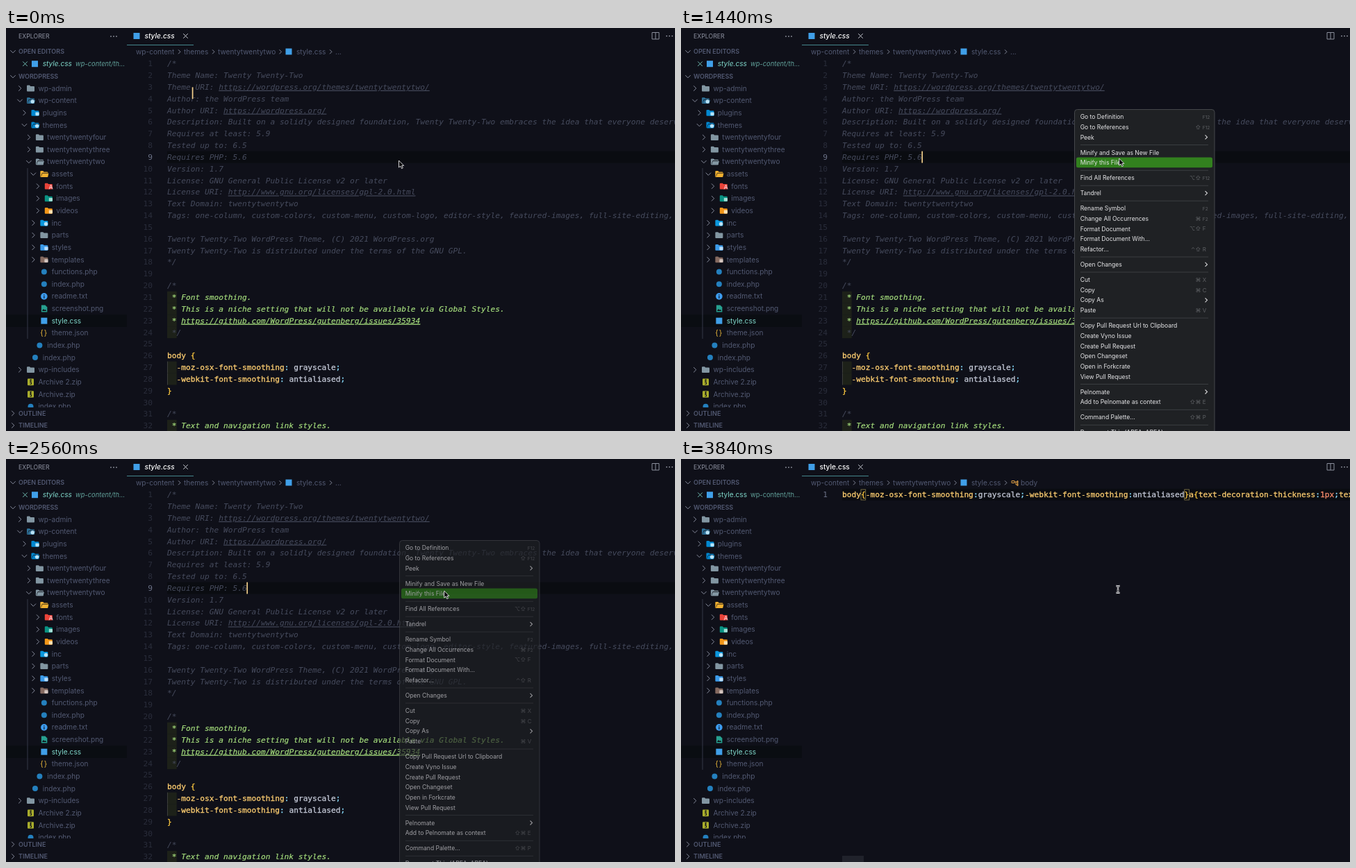
Write an HTML page that moves like this. It is 963 px wide and 581 px high and loops after 3.92 s.

```html
<!DOCTYPE html>
<html lang="en">
<head>
<meta charset="utf-8">
<title>Minify a stylesheet</title>
<style>
  html, body { margin: 0; width: 100%; height: 100%; overflow: hidden; background: #0f1019; }
  svg { display: block; width: 100%; height: 100%; }
  text { white-space: pre; font: 10.15px Inter, sans-serif; fill: #525972; }
  .head { font-size: 9px; font-weight: 600; }
  .code { font: 11.21px "DejaVu Sans Mono", monospace; font-variant-ligatures: none; fill: #c3c8d6; }
  .bright { stroke: #c3c8d6; stroke-width: .3; }
  .comment { font-style: italic; fill: #464b5d; }
  .note { font-style: italic; fill: #a4dc7c; stroke: #a4dc7c; stroke-width: .2; }
  .link { text-decoration: underline 1px; text-underline-offset: 2.4px; }
  .num { text-anchor: end; fill: #2a2d3b; }
  .num.active { fill: #6c7288; }
  .key { fill: #fbcc70; stroke: #fbcc70; }
  .brace { fill: #ffca40; stroke: #ffca40; }
  .punct { fill: #89ddff; stroke: #89ddff; }
  .value { fill: #f78c6c; stroke: #f78c6c; }
  .teal { fill: #80d8cb; }
  .preview .title { font-style: italic; }
  .item { font-size: 8.55px; fill: #e6e6e8; }
  .combo { font: 8px Inter, "DejaVu Sans", sans-serif; fill: #5f6165; }
  .chev { fill: none; stroke: #858a9b; }
</style>
</head>
<body>
<svg id="stage" viewBox="0 0 963 581"></svg>
<script>
const LOOP = 3920, STEP = 80;
const MENU_OPEN = 160, MENU_FADE = 2480, MENU_GONE = 2720, MINIFIED = 3200, CARET_OFF = 3700;
const CODE_X = 232, CHAR = 6.75, LINE = 16.84;

const text = (x, y, content, cls = '', style = '') =>
  `<text x="${x}" y="${y}" class="${cls}" style="${style}">${content}</text>`;
const rect = (x, y, w, h, fill, extra = '') =>
  `<rect x="${x}" y="${y}" width="${w}" height="${h}" fill="${fill}" ${extra}/>`;
const circle = (x, y, r, fill) => `<circle cx="${x}" cy="${y}" r="${r}" fill="${fill}"/>`;
const path = (d, attrs) => `<path d="${d}" ${attrs}/>`;
const at = (x, y, content) => `<g transform="translate(${x} ${y})">${content}</g>`;
const chevron = (x, y, down = false, size = 3.7) =>
  path(`M${-size / 2} ${-size}L${size / 2} 0L${-size / 2} ${size}`,
    `class="chev" transform="translate(${x} ${y}) rotate(${down ? 90 : 0})"`);
const cross = (x, y, color) =>
  path(`M${x - 3.3} ${y - 3.3}l6.6 6.6m0 -6.6l-6.6 6.6`, `stroke="${color}" fill="none"`);
const dots = (x, y) => [-4, 0, 4].map(d => circle(x + d, y, 0.85, '#b4b8c4')).join('');

// Icons, each centred on the origin
const folderBack = 'M-5.5 -3.4q0 -1 1 -1h3l1.3 1.3h4.7q1 0 1 1v5.5q0 1 -1 1h-9q-1 0 -1 -1z';
const dotMark = circle(2.7, 1.4, 2.7, '#b9e2f7');
const boxMark = color => rect(0.5, -0.8, 5.2, 4.8, color, 'rx=".8"');
const icons = {
  folder: (color, mark = '') => path(folderBack, `fill="${color}"`) + mark,
  open: (color, mark = '') => path(folderBack, `fill="${color}"`) +
    path('M-4 3.6L-2.6 -1.2H5.2', 'fill="none" stroke="#0f1019"') +
    path('M-2.5 -.8H6.6L5 4.4H-4.4z', `fill="${color}"`) + mark,
  css: () => rect(-4.5, -4.5, 9, 9, '#409fe8'),
  php: () => circle(0, 0, 4, '#2480be'),
  info: () => circle(0, 0, 4.8, '#3d9cf0') + rect(-.6, -2.7, 1.2, 1.2, '#0f1019') + rect(-.6, -.6, 1.2, 3.4, '#0f1019'),
  image: () => path('M-4 -5H1.5L4.5 -2V5H-4z', 'fill="#27a090"') + path('M-3 3.5l2 -3l1.5 1.7l1.2 -1l1.7 2.3z', 'fill="#0f1019"'),
  json: () => text(-5.6, 3.6, '{}', '', 'fill:#e5b43a;font-size:10.5px;letter-spacing:1px'),
  zip: () => rect(-4.5, -4.8, 9, 9.6, '#a9ad2c', 'rx="1"') +
    path('M-1 -3.5h2l-2 2h2l-2 2h2v2.5h-2', 'fill="none" stroke="#0f1019"')
};

// level, chevron, name, icon, colour, mark
const grey = '#8296a2';
const tree = [
  [0, '>', 'wp-admin', 'folder', grey],
  [0, 'v', 'wp-content', 'open', '#2f7198', dotMark],
  [1, '>', 'plugins', 'folder', '#0288d1', boxMark('#b3e5fc')],
  [1, 'v', 'themes', 'open', '#0288d1', dotMark],
  [2, '>', 'twentytwentyfour', 'folder', grey],
  [2, '>', 'twentytwentythree', 'folder', grey],
  [2, 'v', 'twentytwentytwo', 'open', grey],
  [3, 'v', 'assets', 'open', '#f0b030'],
  [4, '>', 'fonts', 'folder', '#e94339', path('M.8 4.2L3.3 -2L5.8 4.2M1.7 2.2H5', 'fill="none" stroke="#ffcdd2"')],
  [4, '>', 'images', 'folder', '#0a9384', boxMark('#a6ded6')],
  [4, '>', 'videos', 'folder', '#f39618', boxMark('#ffe0b2')],
  [3, '>', 'inc', 'folder', '#0b97dd', dotMark],
  [3, '>', 'parts', 'folder', grey],
  [3, '>', 'styles', 'folder', '#3b9bea', boxMark('#bbdefb')],
  [3, '>', 'templates', 'folder', '#856a60', boxMark('#d3c5bf')],
  [3, '', 'functions.php', 'php'],
  [3, '', 'index.php', 'php'],
  [3, '', 'readme.txt', 'info'],
  [3, '', 'screenshot.png', 'image'],
  [3, '', 'style.css', 'css'],
  [3, '', 'theme.json', 'json'],
  [2, '', 'index.php', 'php'],
  [1, '', 'index.php', 'php'],
  [0, '>', 'wp-includes', 'folder', grey],
  [0, '', 'Archive 2.zip', 'zip'],
  [0, '', 'Archive.zip', 'zip'],
  [0, '', 'index.php', 'php']
];

function sidebar() {
  const rows = tree.map(([level, arrow, name, icon, color, mark], i) => {
    const y = 87 + i * 17.64, shift = level * 6.45;
    const chosen = name === 'style.css';
    return (chosen ? rect(0, y - 8.8, 174, 17.6, '#0a0d12') : '') +
      (arrow ? chevron(20 + shift, y, arrow === 'v') : '') +
      at(35.5 + shift, y, icons[icon](color, mark)) +
      text(46.4 + shift, y + 3.6, name, chosen ? 'teal' : '');
  }).join('');
  const section = (y, name, down) => chevron(10, y, down) + text(18, y + 3.2, name, 'head');
  return `<clipPath id="treeArea"><rect width="174" height="547"/></clipPath>
    <g clip-path="url(#treeArea)">${rows}</g>` +
    path('M31 202V448', 'stroke="#343849"') +
    text(18, 14.8, 'EXPLORER', '', 'font-size:8.75px;fill:#8f93a2') + dots(155, 12) +
    section(34, 'OPEN EDITORS', true) + section(70, 'WORDPRESS', true) +
    section(555.5, 'OUTLINE') + section(573, 'TIMELINE') +
    cross(27.5, 51.7, '#6fbdb2') + at(41.5, 51.7, icons.css()) +
    text(52.7, 55.4, 'style.css', 'teal title') +
    text(100, 55.2, 'wp-content/th...', 'teal title', 'font-size:9.35px;opacity:.72');
}

function editorTop() {
  return at(188, 11.5, icons.css()) + text(199.5, 15.2, 'style.css', 'title', 'fill:#fff;font-weight:500') +
    cross(258.5, 11.5, '#c6c9d2') + rect(174, 24, 96, 1, '#44868c') +
    [[187, 'wp-content'], [256, 'themes'], [305, 'twentytwentytwo'], [418, 'style.css']]
      .map(([x, name]) => text(x, 37.8, name)).join('') +
    [249.5, 298.5, 395, 467.5].map(x => chevron(x, 34.3, false, 3)).join('') +
    at(407, 34, icons.css()) +
    path('M930 6.5h10v9.5h-10zM935 6.5v9.5', 'fill="none" stroke="#8b8f9c"') + dots(955, 11.5);
}

const header = `/*
Theme Name: Twenty Twenty-Two
Theme URI: https://wordpress.org/themes/twentytwentytwo/
Author: the WordPress team
Author URI: https://wordpress.org/
Description: Built on a solidly designed foundation, Twenty Twenty-Two embraces the idea that everyone deserves
Requires at least: 5.9
Tested up to: 6.5
Requires PHP: 5.6
Version: 1.7
License: GNU General Public License v2 or later
License URI: http://www.gnu.org/licenses/gpl-2.0.html
Text Domain: twentytwentytwo
Tags: one-column, custom-colors, custom-menu, custom-logo, editor-style, featured-images, full-site-editing,

Twenty Twenty-Two WordPress Theme, (C) 2021 WordPress.org
Twenty Twenty-Two is distributed under the terms of the GNU GPL.
*/

/*
 * Font smoothing.
 * This is a niche setting that will not be available via Global Styles.
 * https://github.com/WordPress/gutenberg/issues/35934
 */

body {
  -moz-osx-font-smoothing: grayscale;
  -webkit-font-smoothing: antialiased;
}

/*
 * Text and navigation link styles.`.split('\n');
const minified = 'body{-moz-osx-font-smoothing:grayscale;-webkit-font-smoothing:antialiased}' +
  'a{text-decoration-thickness:1px;text-underline-offset:.1em}';

const lineY = n => 51.3 + (n - 1) * LINE;
const colX = col => CODE_X + col * CHAR;
const codeLine = (n, content, cls) => text(CODE_X, lineY(n) + 3.9, content, 'code ' + cls);
const lineNumber = (n, active) => text(211, lineY(n) + 3.9, n, 'code num' + (active ? ' active' : ''));
const activeLine = n => rect(CODE_X, lineY(n) - LINE / 2, 731, LINE, '#0a0c11');

const paintCss = css => css.replace(/(\d+px)|([\w-]+)(?=\s*[:{])|([{}])|([:;])/g,
  (token, value, key, brace) => {
    const cls = value ? 'value' : key ? 'key' : brace ? 'brace' : 'punct';
    return `<tspan class="${cls}">${token}</tspan>`;
  });
const paintLinks = line => line.replace(/https?:\S+/, '<tspan class="link">$&</tspan>');

function fullCode() {
  return activeLine(9) + header.map((line, i) => {
    const n = i + 1, isCss = n > 25 && n < 30, top = lineY(n) - LINE / 2;
    const indent = line.startsWith(' ') ? rect(CODE_X, top, 13.7, LINE + .1, '#1d2119') : '';
    const guide = line.startsWith('  ') ? rect(CODE_X, top, 1, LINE + .1, '#3b3e3b') : '';
    const cls = isCss ? 'bright' : /^ \* /.test(line) ? 'note' : 'comment';
    return indent + guide + lineNumber(n, n === 9) + codeLine(n, isCss ? paintCss(line) : paintLinks(line), cls);
  }).join('') + text(474, 37.8, '...');
}

function minifiedCode() {
  const bracket = char => rect(colX(minified.indexOf(char)), 44, CHAR, 15, 'none', 'stroke="#8d8050" stroke-width=".8"');
  return activeLine(1) + lineNumber(1, true) + bracket('{') + bracket('}') +
    codeLine(1, paintCss(minified), 'bright') + rect(CODE_X, 572, 31, 9, '#20222b') +
    path('M476 31.5h4v3h-4zM480 33h5M482 33v4h3M485 31.5h-1v3h1zM485 35.5h-1v3h1z', 'fill="none" stroke="#d89a45"') +
    text(489, 37.8, 'body');
}

// Label, then modifiers and key, or '>' for a submenu
const menuGroups = [
  [['Go to Definition', '', 'F12'], ['Go to References', '⇧', 'F12'], ['Peek', '>']],
  [['Minify and Save as New File'], ['Minify this File']],
  [['Find All References', '⌥⇧', 'F12']],
  [['Tandrel', '>']],
  [['Rename Symbol', '', 'F2'], ['Change All Occurrences', '⌘', 'F2'], ['Format Document', '⌥⇧', 'F'],
    ['Format Document With...'], ['Refactor...', '⌃⇧', 'R']],
  [['Open Changes', '>']],
  [['Cut', '⌘', 'X'], ['Copy', '⌘', 'C'], ['Copy As', '>'], ['Paste', '⌘', 'V']],
  [['Copy Pull Request Url to Clipboard'], ['Create Vyno Issue'], ['Create Pull Request'],
    ['Open Changeset'], ['Open in Forkcrate'], ['View Pull Request']],
  [['Pelnomate', '>'], ['Add to Pelnomate as context', '⇧⌘', 'E']],
  [['Command Palette...', '⇧⌘', 'P']],
  [['Document This (AREA, AREA)']]
];

function menu() {
  let y = 128, out = '';
  menuGroups.forEach((group, g) => {
    if (g) {
      out += rect(575, y - 4, 184, .8, '#424448');
      y += 7.3;
    }
    for (const [label, modifiers, key] of group) {
      out += text(574.7, y + 3.1, label, 'item');
      if (modifiers === '>') {
        out += path(`M754.5 ${y - 3}l3 3l-3 3`, 'fill="none" stroke="#d8d8da" stroke-width="1.1"');
      } else if (key) {
        out += text(748.5, y + 2.9, modifiers, 'combo', 'text-anchor:end') +
          text(750.8, y + 2.9, key, 'combo', key.length > 1 ? 'font-size:6.6px' : '');
      }
      y += 14.7;
    }
  });
  return rect(566.5, 117.5, 201.5, 475, '#1f2124', 'rx="4" stroke="#45474b"') +
    rect(569, 0, 196, 14.6, '#32801e', 'rx="2.5" id="highlight"') + out;
}

const arrow = path('M0 0V10L2.4 8L4 11.6L5.8 10.8L4.2 7.4H7.2z',
  'fill="#08080a" stroke="#e8e8ea" stroke-width=".9" stroke-linejoin="round"');
const beamShape = 'M-2.6 -5Q0 -5 0 -3.4Q0 -5 2.6 -5M-2.6 5Q0 5 0 3.4Q0 5 2.6 5M0 -3.4V3.4M-1.4 1.4H1.4';
const beam = path(beamShape, 'fill="none" stroke="#f0f0f2" stroke-width="2.3"') +
  path(beamShape, 'fill="none" stroke="#15161c" stroke-width=".7"');

const $ = id => document.getElementById(id);
$('stage').innerHTML = `<rect width="963" height="581" fill="#0f1019"/>
  <g id="full">${fullCode()}</g><g id="short">${minifiedCode()}</g>
  <g id="chrome">${sidebar()}${editorTop()}</g>
  ${rect(-.4, -8.4, 1.7, LINE, '#f3d08c', 'id="caret"')}
  <g id="menu">${menu()}</g>
  <g id="pointer"><g id="arrow">${arrow}</g><g id="beam">${beam}</g></g>`;

// Pointer stops: time, x, y
const stops = [[0, 565.5, 191], [560, 565.5, 191], [960, 632, 173], [1120, 632, 173],
  [1360, 630.7, 188], [2400, 630.7, 190], [3040, 631, 190], [3840, 629, 188], [LOOP, 629, 188]];

function pointerAt(t) {
  const next = stops.findIndex(stop => stop[0] > t);
  const [t0, x0, y0] = stops[next - 1], [t1, x1, y1] = stops[next];
  const p = (t - t0) / (t1 - t0), eased = p * p * (3 - 2 * p);
  return [x0 + (x1 - x0) * eased, y0 + (y1 - y0) * eased];
}

const show = (id, visible) => $(id).setAttribute('display', visible ? 'inline' : 'none');
const move = (id, x, y) => $(id).setAttribute('transform', `translate(${x} ${y})`);

function draw(now) {
  const t = Math.floor(now % LOOP / STEP) * STEP;
  const short = t >= MINIFIED, menuOpen = t >= MENU_OPEN && t < MENU_GONE;
  show('full', !short);
  show('short', short);
  $('chrome').setAttribute('class', short ? '' : 'preview');

  // The caret glides from the first line to its place during the first step
  const glide = t < STEP ? 0.315 : 1;
  move('caret', colX(17 * glide), lineY(short ? 1 : 1 + 8 * glide));
  show('caret', t < CARET_OFF);

  const [x, y] = pointerAt(t);
  move('pointer', x, y);
  show('arrow', t < MENU_GONE);
  show('beam', t >= MENU_GONE);

  show('menu', menuOpen);
  $('menu').setAttribute('opacity', Math.min(1, 1 - (t - MENU_FADE) / (MENU_GONE - MENU_FADE)));
  $('highlight').setAttribute('y', y < 186.6 ? 171.9 : 186.6);
  show('highlight', t < 2400 || t >= 2480);
}

function tick() {
  draw(performance.now());
  requestAnimationFrame(tick);
}
tick();
</script>
</body>
</html>
```
